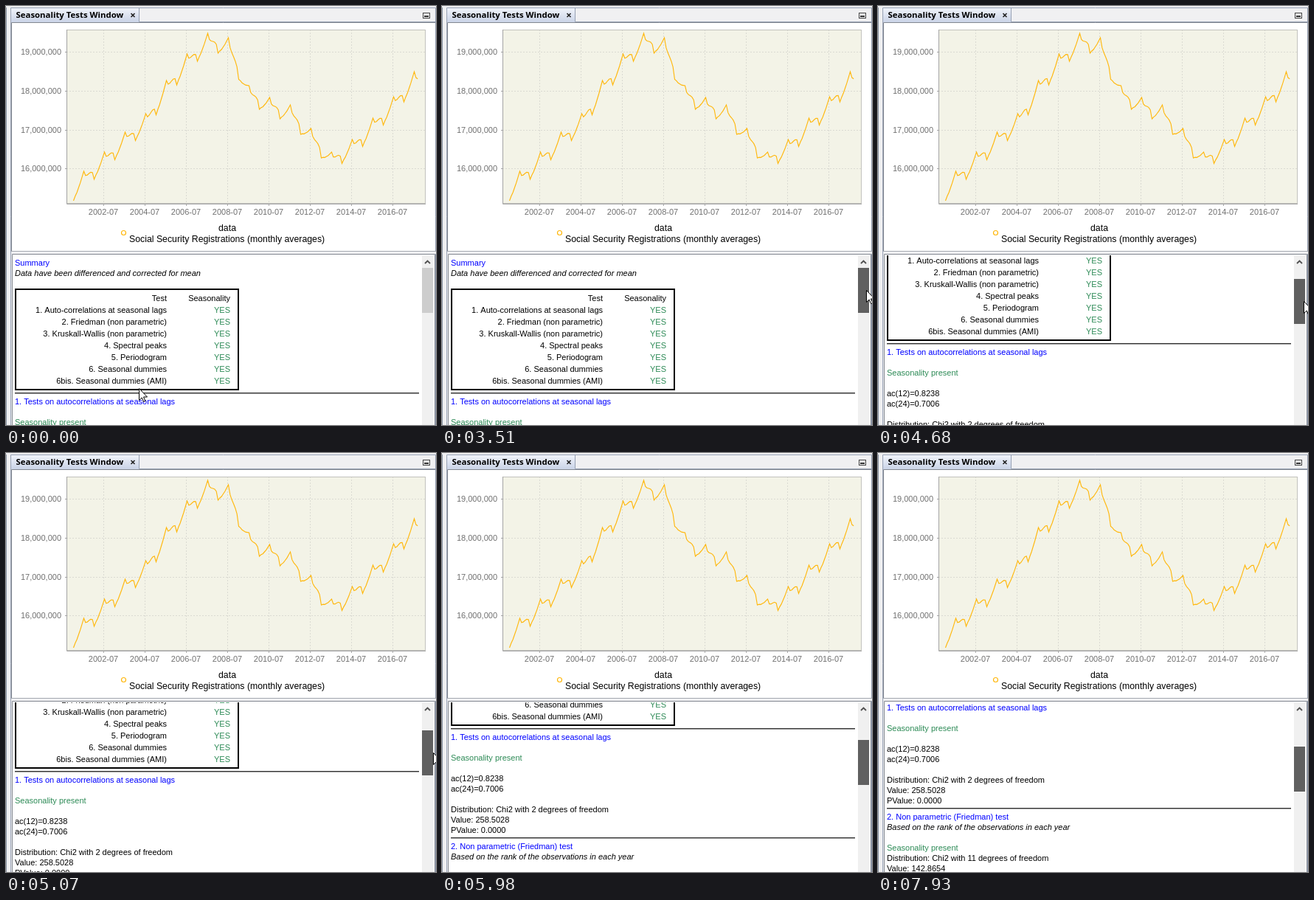
These frames come from a looping animation (583 by 568 pixels, 8000 ms). An HTML page with a canvas:

```html
<!DOCTYPE html>
<html lang="en">
<head>
<meta charset="utf-8">
<title>Seasonality Tests</title>
<style>
  html, body { margin: 0; width: 100%; height: 100%; overflow: hidden; background: #fff; }
  canvas { display: block; }
</style>
</head>
<body>
<canvas id="stage" width="583" height="568"></canvas>
<script>
const LOOP = 8000, TICK = 130;
const SANS = '"Liberation Sans", Arial, sans-serif';
const BLUE = '#0000ff', GREEN = '#2e8b57', ORANGE = '#ffb80e';
const BORDER = '#828790', AXIS = '#a4a4a4', LABEL = '#707070';
const ctx = document.getElementById('stage').getContext('2d');

function rect(x, y, w, h, color) {
  ctx.fillStyle = color;
  ctx.fillRect(x, y, w, h);
}

function frame(x, y, w, h, color, width = 1) {
  ctx.strokeStyle = color;
  ctx.lineWidth = width;
  ctx.strokeRect(x, y, w, h);
}

function path(points, color, width = 1) {
  ctx.beginPath();
  points.forEach(([x, y]) => ctx.lineTo(x, y));
  ctx.strokeStyle = color;
  ctx.lineWidth = width;
  ctx.stroke();
}

function text(str, x, y, { color = '#000', font = '11px ' + SANS, align = 'left' } = {}) {
  ctx.fillStyle = color;
  ctx.font = font;
  ctx.textAlign = align;
  ctx.fillText(str, x, y);
}

// Runs linear moves { from, to, at } one after another, resting in between.
function follow(start, moves, t) {
  return moves.reduce((pos, { from, to, at }) => {
    const p = Math.min(1, Math.max(0, (t - from) / (to - from)));
    return pos.map((v, i) => v + (at[i] - v) * p);
  }, start);
}

const pointerMoves = [
  { from: 0, to: 520, at: [38, 412] },
  { from: 520, to: 650, at: [60, 409] },
  { from: 1040, to: 1690, at: [222, 417] },
  { from: 1820, to: 2730, at: [570, 393] },
  { from: 2860, to: 3510, at: [575, 385] }
];
const dragMoves = [
  { from: 3900, to: 4290, at: [11] },
  { from: 4290, to: 4420, at: [13] },
  { from: 4550, to: 5980, at: [34] },
  { from: 6500, to: 6890, at: [41] },
  { from: 7800, to: 7930, at: [43] }
];

// Yearly July levels joined by straight lines, plus a repeating monthly sag.
const julyLevels = [256, 224, 198, 171, 146, 101, 65, 37, 43, 108, 124, 134, 166, 198, 181, 152, 123, 89, 90];
const monthlySag = [0, 8, 9.5, 9.5, 10, 12.5, 24, 20.5, 18, 14, 10, 5];
const YEAR_WIDTH = 28, FIRST_MONTH = 6, MONTHS = 201;
const series = Array.from({ length: MONTHS }, (_, i) => {
  const years = (i + FIRST_MONTH) / 12, year = Math.floor(years);
  const trend = julyLevels[year] + (julyLevels[year + 1] - julyLevels[year]) * (years - year);
  return [77.5 + YEAR_WIDTH * years, trend + monthlySag[(i + FIRST_MONTH) % 12]];
});

function drawHeader() {
  rect(0, 0, 583, 568, '#f0f0f2');
  rect(0, 2, 1, 566, '#8e98a8');
  const tab = ctx.createLinearGradient(0, 3, 0, 21);
  tab.addColorStop(0, '#f0f3fa');
  tab.addColorStop(1, '#ccd5e8');
  rect(6, 2, 175, 20, tab);
  path([[6.5, 568], [6.5, 2.5], [582.5, 2.5], [582.5, 568]], '#97a1b4');
  path([[180.5, 2], [180.5, 21.5], [583, 21.5]], '#97a1b4');
  text('Seasonality Tests Window', 13.5, 16, {
    font: 'bold 11.4px "Noto Sans", "Open Sans", sans-serif'
  });
  path([[169.5, 10], [174.5, 15]], '#222', 1.6);
  path([[174.5, 10], [169.5, 15]], '#222', 1.6);
  frame(565.5, 9.5, 9, 7, '#444');
  rect(567, 13, 6, 2, '#333');
}

function drawChart() {
  rect(7, 22, 575, 311, '#fff');
  path([[7.5, 332.5], [7.5, 22.5], [582, 22.5]], BORDER);
  rect(82, 32, 487, 236, '#f3f3e7');

  ctx.setLineDash([2, 2]);
  const ticks = Array.from({ length: 8 }, (_, i) => 132.5 + 2 * YEAR_WIDTH * i);
  const rows = Array.from({ length: 4 }, (_, i) => Math.round(62 + 52.8 * i) + 0.5);
  ticks.forEach(x => path([[x, 32], [x, 268]], '#dadad2'));
  rows.forEach(y => path([[82, y], [568, y]], '#dadad2'));
  ctx.setLineDash([]);

  frame(82.5, 32.5, 486, 235, '#c2c2bd');
  path([[82.5, 32], [82.5, 268.5], [569, 268.5]], AXIS);
  rows.forEach((y, i) => {
    path([[80, y], [82, y]], AXIS);
    text(`${19 - i},000,000`, 75, y + 3.5, { color: LABEL, align: 'right' });
  });
  ticks.forEach((x, i) => {
    path([[x, 269], [x, 271]], AXIS);
    text(`${2002 + 2 * i}-07`, x - 0.5, 283, { color: LABEL, align: 'center' });
  });
  path(series, ORANGE, 1.15);

  const legend = '12.3px ' + SANS;
  text('data', 300, 305, { font: legend, align: 'center' });
  text('Social Security Registrations (monthly averages)', 167, 320, { font: legend });
  ctx.beginPath();
  ctx.arc(159.5, 307.5, 3, 0, 2 * Math.PI);
  ctx.strokeStyle = ORANGE;
  ctx.lineWidth = 1.2;
  ctx.stroke();
}

const testNames = [
  '1. Auto-correlations at seasonal lags', '2. Friedman (non parametric)',
  '3. Kruskall-Wallis (non parametric)', '4. Spectral peaks', '5. Periodogram',
  '6. Seasonal dummies', '6bis. Seasonal dummies (AMI)'
];
const LINE_HEIGHT = 14;
const sections = [
  { top: 352, lines: ['Summary', 'Data have been differenced and corrected for mean'] },
  { top: 540, lines: [
    '1. Tests on autocorrelations at seasonal lags', '', 'Seasonality present', '',
    'ac(12)=0.8238', 'ac(24)=0.7006', '',
    'Distribution: Chi2 with 2 degrees of freedom', 'Value: 258.5028', 'PValue: 0.0000'
  ] },
  { top: 688, lines: [
    '2. Non parametric (Friedman) test', 'Based on the rank of the observations in each year', '',
    'Seasonality present', 'Distribution: Chi2 with 11 degrees of freedom', 'Value: 142.8654'
  ] }
];

function lineStyle(line, index) {
  if (index === 0) return { color: BLUE };
  if (index === 1) return { font: 'italic 11px ' + SANS };
  return line.startsWith('Seasonality') ? { color: GREEN } : {};
}

function drawReport(scroll) {
  rect(7, 332, 576, 1, '#a4a8b0');
  rect(7, 333, 576, 3, '#f0f0f2');
  rect(8, 336, 574, 232, '#fff');
  ctx.save();
  ctx.beginPath();
  ctx.rect(9, 338, 555, 230);
  ctx.clip();
  ctx.translate(0, -scroll);
  sections.forEach(({ top, lines }, n) => {
    lines.forEach((line, i) => text(line, 12, top + LINE_HEIGHT * i, lineStyle(line, i)));
    if (n > 0) {
      rect(12, top - 16, 548, 1, '#333');
      rect(12, top - 15, 548, 1, '#a0a0a0');
    }
  });
  frame(13, 384, 302, 136, '#000', 2);
  text('Test', 218, 400, { align: 'right' });
  text('Seasonality', 304, 400, { align: 'right' });
  testNames.forEach((name, i) => {
    const y = 416 + 16 * i;
    text(name, 218, y, { align: 'right' });
    text('YES', 304, y, { align: 'right', color: GREEN });
  });
  ctx.restore();
  path([[8.5, 568], [8.5, 336.5], [581.5, 336.5], [581.5, 568]], BORDER);
}

function drawScrollbar(drag, t) {
  rect(564, 338, 16, 230, '#f0f0f0');
  path([[568, 349], [571.5, 345.5], [575, 349]], '#505050', 1.8);
  const color = t >= 3380 ? '#606060' : t >= 2730 ? '#a6a6a6' : '#cdcdcd';
  rect(564, 355 + drag, 15, 61, color);
}

function drawPointer(x, y) {
  ctx.save();
  ctx.translate(Math.round(x) + 0.5, Math.round(y) + 0.5);
  ctx.beginPath();
  [[0, 0], [0, 16], [3.7, 12.5], [6.2, 18], [8.4, 17], [6, 11.5], [11, 11.5]]
    .forEach(([px, py]) => ctx.lineTo(px, py));
  ctx.closePath();
  ctx.fillStyle = '#fff';
  ctx.fill();
  ctx.strokeStyle = '#000';
  ctx.lineWidth = 1;
  ctx.stroke();
  ctx.restore();
}

function render(now) {
  const t = Math.floor((now % LOOP) / TICK) * TICK;
  const drag = Math.round(follow([0], dragMoves, t)[0]);
  const [x, y] = follow([180, 518], pointerMoves, t);
  drawHeader();
  drawChart();
  drawReport(Math.round(drag * 4.45));
  drawScrollbar(drag, t);
  // While dragging, the pointer drifts off the right edge.
  drawPointer(x + drag * drag / 110, y + drag);
  requestAnimationFrame(render);
}
requestAnimationFrame(render);
</script>
</body>
</html>
```
